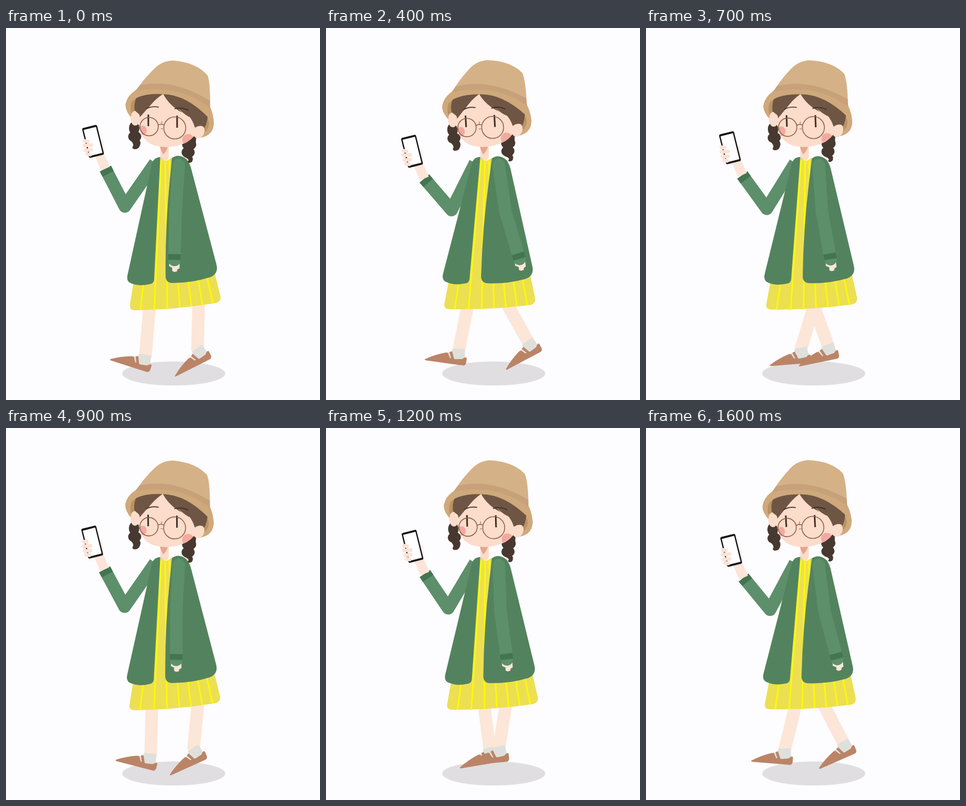
Write an HTML page that moves like this. It is 600 by 709 pixels and loops after 2 s.

```html
<!DOCTYPE html>
<html lang="en">
<head>
<meta charset="utf-8">
<title>Walking girl</title>
<style>
  html, body { margin: 0; width: 100%; height: 100%; overflow: hidden; background: #fdfcfe; }
  svg { display: block; width: 100%; height: 100%; }
  .skin { fill: #fcdccb; }
  .leg { stroke: #fce6d8; stroke-width: 24; }
  .pale { fill: #fce6d8; }
  .sleeve { fill: none; stroke: #5d8f6b; stroke-width: 24; stroke-linejoin: round; }
  .cuff { stroke: #437550; stroke-width: 24; }
  .coat { fill: #53835e; }
  .hair { fill: #6f5544; }
  .braid { fill: #473930; }
  .brim { fill: #cfa97b; }
  .shoe { fill: #bb8467; }
  .strap { stroke: #bb8467; stroke-width: 5; }
  .sock { fill: #dfe0dc; }
  .stripes { fill: none; stroke: #fdf80c; stroke-width: 3; }
  .line { fill: none; stroke: #8a5f4a; stroke-width: 1.6; }
  .dark { fill: none; stroke: #3d2b22; }
  .finger { fill: none; stroke: #fde2d6; stroke-width: 7; stroke-linecap: round; }
</style>
</head>
<body>
<svg viewBox="0 0 600 709" xmlns="http://www.w3.org/2000/svg">
  <defs>
    <g id="foot">
      <path class="sock" d="M-12 0L11 -3L14 18L-12 20L-22 14L-20 8L-14 8Z"/>
      <path class="shoe" d="M-62 27Q-45 16 -24 9L-20 9L-15 18L-4 19L9 17Q14 11 17 14V24Q16 29 11 29H-59Q-63 29 -62 27Z"/>
      <path class="strap" d="M-15 6L-9 20"/>
    </g>
    <clipPath id="faceClip"><path d="M300 120L254 172Q253 214 284 224Q315 232 345 218Q362 208 370 188V160Z"/></clipPath>
  </defs>

  <ellipse cx="320.5" cy="658.5" rx="98.5" ry="23" fill="#e0dee1"/>
  <path id="legP" class="leg"/><use id="footP" href="#foot"/>
  <path id="legQ" class="leg"/><use id="footQ" href="#foot"/>

  <path class="skin" d="M295 224H311V247L304 256L295 247Z"/>
  <path fill="#e2a88e" d="M294 224H309Q309 234 300 241L295 230Z"/>

  <path id="armL" class="sleeve"/>
  <path id="cuffL" class="cuff"/>

  <g id="body">
    <path fill="#ecdf52" d="M296 246L304 255L317 247L340 300L399 468L410 512Q411 521 402 524Q325 537 246 538Q235 538 237 527L246 470L288 300Z"/>
    <path id="stripes" class="stripes"/>
    <path class="coat" d="M279 258Q283 246 295 246L294 262L283 480Q282 487 275 488Q255 493 240 487Q230 484 232 472Z"/>
    <path class="coat" d="M317 248Q330 238 345 250Q350 256 353 265L402 450Q407 468 390 475Q355 486 318 486Q306 486 305 474Q304 380 313 290Z"/>
  </g>

  <g id="handR"><path class="pale" d="M-9.5 -2H10V16L6 18L5 22L0 23L-4 21V15L-10 12Z"/></g>
  <path id="armR" class="sleeve"/>
  <path id="cuffR" class="cuff"/>

  <g id="handL">
    <path fill="none" stroke="#fde4d8" stroke-width="18" d="M0 0L-13 -30"/>
    <path fill="none" stroke="#fdeee7" stroke-width="6" stroke-linecap="round" d="M-7 -52L-5 -34"/>
    <g transform="translate(-23.7 -52) rotate(-14)">
      <rect x="-14.7" y="-29.3" width="29.4" height="58.6" rx="3" fill="#151515"/>
      <rect x="-12.2" y="-25.5" width="24.4" height="51" fill="#fff"/>
    </g>
    <path class="finger" d="M-40 -53L-34 -52M-40 -44L-27 -45M-38 -35L-27 -36M-35 -28L-29 -27"/>
  </g>

  <g id="head">
    <g id="braidL" class="braid">
      <ellipse cx="245" cy="191" rx="10" ry="13"/>
      <ellipse cx="246" cy="207" rx="12.5" ry="10.5"/>
      <path d="M240 211Q257 208 257 220Q255 231 247 231Q240 231 242 226Q245 223 240 216Z"/>
    </g>
    <path class="brim" d="M240 172Q226 155 229 143Q236 124 268 118Q330 112 376 148Q398 166 397 184Q395 209 362 210Z"/>
    <path fill="#b99264" d="M243 170Q232 150 240 138Q290 118 345 140Q388 162 388 183Q385 202 364 206Z"/>
    <g id="braidR" class="braid">
      <path d="M342 218Q346 206 364 206L362 222Z"/>
      <ellipse cx="350" cy="222" rx="13.5" ry="11"/>
      <ellipse cx="348" cy="237" rx="12.5" ry="10.5"/>
      <path d="M341 243Q357 242 357 249Q357 257 350 257Q345 256 349 252Q347 248 341 246Z"/>
    </g>
    <path class="hair" d="M248 170Q242 145 250 132Q310 112 385 165Q386 185 372 200L350 200Z"/>
    <ellipse class="skin" cx="247" cy="172" rx="9" ry="14"/>
    <ellipse class="skin" cx="369" cy="198" rx="10" ry="13" transform="rotate(25 369 198)"/>
    <path class="skin" d="M300 120L254 172Q253 214 284 224Q315 232 345 218Q362 208 370 188V160Z"/>
    <g clip-path="url(#faceClip)" fill="#f4a9a0">
      <ellipse cx="261" cy="195" rx="8" ry="9"/>
      <circle cx="348" cy="213" r="11"/>
    </g>
    <path class="hair" d="M248 134Q275 122 301 125Q283 137 271 153L277 141Q264 152 258 167L248 159Z"/>
    <path class="hair" d="M300 125Q312 148 336 161L329 153Q344 168 354 171L350 168Q358 178 361 190Q370 184 378 188Q386 175 386 163Q350 126 300 123Z"/>
    <path class="dark" stroke-width="1.7" d="M268 154Q279 148 292 151M322 154Q336 150 349 157"/>
    <path class="dark" stroke-width="3" d="M272 165V187M327 167V190"/>
    <g class="line">
      <circle cx="273.5" cy="188" r="17.5"/>
      <circle cx="322.5" cy="190.5" r="21"/>
      <path d="M291 185Q296 182 302 185"/>
      <path stroke-width="1" d="M298 178L297 184M296 192H300"/>
    </g>
    <path class="brim" d="M240 169Q227 155 229 144Q231 130 247 119Q325 102 390 150Q398 168 397 186L388 172Q345 127 300 126Q255 124 241 140Q236 150 240 169Z"/>
    <path fill="#d5b187" d="M249 119Q262 98 285 76Q300 62 320 62Q364 66 385 90Q391 105 390 152Q330 100 249 119Z"/>
    <path fill="#c6a17a" d="M247 120L256 109Q320 95 390 139V153Q330 105 247 120Z"/>
  </g>
</svg>
<script>
const el = id => document.getElementById(id);
const set = (id, name, value) => el(id).setAttribute(name, value);

// One stride is ten steps: ease from pose a to pose b, rest briefly, ease back.
const CYCLE = 10, STEP = 100, LOOP = 2000, LAST = 16;

// hip x, toe x, toe y, foot angle; out and back push the hip off the straight path
const legs = {
  P: { a: [369, 324, 664, -27], b: [270, 188, 632, 8], out: -17, back: 16 },
  Q: { a: [273, 198, 632, 18], b: [349, 345, 651, -28], out: 32, back: 0 }
};
// elbow x, elbow y, cuff x, cuff y
const arms = {
  L: { from: [285, 257], a: [227, 340, 190, 268], b: [240, 347, 188, 287], back: -5 },
  R: { from: [330, 261], a: [324, 350, 321.5, 442], b: [343, 350, 370, 440], back: 0 }
};

const ease = u => {
  u = Math.min(1, Math.max(0, u));
  return u * u * (3 - 2 * u);
};
const mix = ({ a, b }, w) => a.map((v, i) => v + (b[i] - v) * w);

function gait(k) {
  const out = k < 5;
  const w = out ? ease((k + .2) / 4.4) : 1 - ease((k - 5.1) / 4.7);
  return { out, w, arc: 4 * w * (1 - w) };
}

function drawLeg(id, { out, w, arc }) {
  const leg = legs[id];
  const [hip, toeX, toeY, deg] = mix(leg, w);
  const a = deg * Math.PI / 180, c = Math.cos(a), s = Math.sin(a);
  const x = toeX + 62 * c + 28 * s, y = toeY + 62 * s - 28 * c;
  const slope = (hip + arc * (out ? leg.out : leg.back) - x) / (532 - y);
  set('leg' + id, 'd', `M${x + slope * (510 - y)} 510L${x + 4 * slope} ${y + 4}`);
  set('foot' + id, 'transform', `translate(${x} ${y}) rotate(${deg})`);
}

function drawArm(id, { out, w, arc }) {
  const arm = arms[id], shift = out ? 0 : arm.back * arc;
  const [ex, ey, x, y] = mix(arm, w).map((v, i) => i % 2 ? v : v + shift);
  const len = Math.hypot(x - ex, y - ey), ux = (x - ex) / len, uy = (y - ey) / len;
  set('arm' + id, 'd', `M${arm.from}L${ex} ${ey}L${x} ${y}`);
  set('cuff' + id, 'd', `M${x - 11 * ux} ${y - 11 * uy}L${x} ${y}`);
  const turn = id === 'R' ? Math.atan2(-ux, uy) * 90 / Math.PI : 0;
  set('hand' + id, 'transform', `translate(${x} ${y}) rotate(${turn})`);
}

function draw(k) {
  const pose = gait(k), { w } = pose;
  set('body', 'transform', `rotate(${2.2 * w} 300 247)`);
  set('head', 'transform', `translate(${-1.5 * w}) rotate(${-3.3 * w} 303 235)`);
  set('braidL', 'transform', `rotate(${-3.5 * w} 245 182)`);
  set('braidR', 'transform', `rotate(${-2 * w} 356 208)`);
  for (const id in legs) drawLeg(id, pose);
  for (const id in arms) drawArm(id, pose);
}

// Dress stripes fan out from the neckline to the hem
let fan = '';
for (let i = 0; i < 7; i++) {
  const x = 257 + 27 * i - .65 * i * i;
  fan += `M${289 + 7.5 * i} 252L${x} ${538 - Math.max(0, x - 290) * .12}`;
}
set('stripes', 'd', fan);
set('armR', 'stroke-linecap', 'round');

let shown = -1;
function tick() {
  const step = Math.min(LAST, Math.floor(performance.now() % LOOP / STEP));
  if (step !== shown) draw((shown = step) % CYCLE);
  requestAnimationFrame(tick);
}
tick();
</script>
</body>
</html>
```
